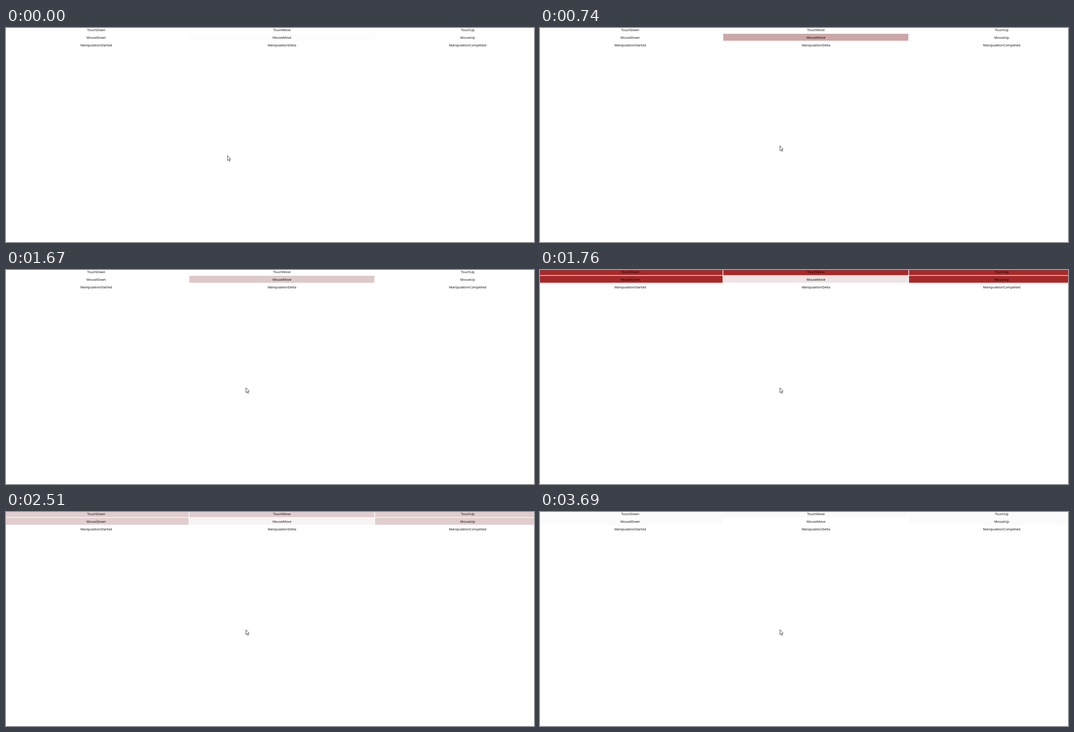
These frames come from a looping animation (1174x477 px, 3840 ms). An HTML page with a canvas:

```html
<!DOCTYPE html>
<html lang="en">
<head>
<meta charset="utf-8">
<title>Input events</title>
<style>
html, body { margin: 0; width: 100%; height: 100%; overflow: hidden; background: #fff; }
canvas { display: block; }
</style>
</head>
<body>
<canvas id="stage" width="1174" height="477"></canvas>
<script>
const ctx = document.getElementById('stage').getContext('2d');
const LOOP = 3840;
const COLUMN = 413;
const ROW = 16.75;
const HALF_LIFE = 350;
const BROWN = [165, 42, 42];

const labels = [
  ['TouchDown', 'TouchMove', 'TouchUp'],
  ['MouseDown', 'MouseMove', 'MouseUp'],
  ['ManipulationStarted', 'ManipulationDelta', 'ManipulationCompleted']
];

// The screen refreshes only at these times and trails the input by one refresh.
const refreshes = [0, 70, 420, 510, 580, 660, 740, 890, 980,
  1360, 1670, 1760, 2130, 2510, 2910, 3290, 3690];

const moves = [
  { at: -2000, x: 492, y: 284 },
  { at: 60, x: 502, y: 278 },
  { at: 315, x: 513, y: 272 },
  { at: 425, x: 533, y: 262 },
  { at: 934, x: 533, y: 262 }
];
const TAP = 1670;

const toLinear = v => ((v / 255 + 0.055) / 1.055) ** 2.4;
const toByte = v =>
  Math.round(255 * (v <= 0.0031308 ? v * 12.92 : 1.055 * v ** (1 / 2.4) - 0.055));

// Brown fades to white in linear light.
function shade(strength) {
  const rgb = BROWN.map(c => toByte(1 - strength * (1 - toLinear(c))));
  return `rgb(${rgb.join(',')})`;
}

const fade = age => age < 0 ? 0 : 2 ** (-age / HALF_LIFE);

function bar(row, col, strength) {
  if (strength < 0.01) return;
  ctx.fillStyle = shade(strength);
  ctx.fillRect(col * COLUMN - 5.5, row * ROW - 3.9, 411.5, 15.5);
}

function cursor({ x, y }) {
  ctx.save();
  ctx.translate(x + 0.5, y + 0.5);
  const shape = [[0, 0], [0, 11], [2.4, 8.7], [4.2, 12.4], [5.8, 11.7], [4.1, 8], [7.2, 7.7]];
  ctx.beginPath();
  shape.forEach(([px, py]) => ctx.lineTo(px, py));
  ctx.closePath();
  ctx.fillStyle = '#fff';
  ctx.fill();
  ctx.strokeStyle = '#1c1c2c';
  ctx.lineWidth = 0.85;
  ctx.stroke();
  ctx.restore();
}

function draw(time) {
  const shown = refreshes.findLastIndex(t => t <= time);
  const now = shown ? refreshes[shown - 1] : 0;
  const move = moves.findLast(m => m.at <= now);

  ctx.fillStyle = '#fff';
  ctx.fillRect(0, 0, 1174, 477);

  for (let row = 0; row < 2; row++) {
    for (let col = 0; col < 3; col++) {
      const moving = row === 1 && col === 1;
      bar(row, col, fade(now - (moving ? move.at : TAP)));
    }
  }

  ctx.fillStyle = '#000';
  ctx.font = '7.35px "Open Sans", "Noto Sans", sans-serif';
  ctx.textAlign = 'center';
  labels.forEach((line, row) => line.forEach((text, col) =>
    ctx.fillText(text, 200.6 + col * COLUMN, Math.round(7.2 + row * ROW))));

  cursor(move);
}

const start = performance.now();
function tick() {
  draw((performance.now() - start) % LOOP);
  requestAnimationFrame(tick);
}
tick();
</script>
</body>
</html>
```
